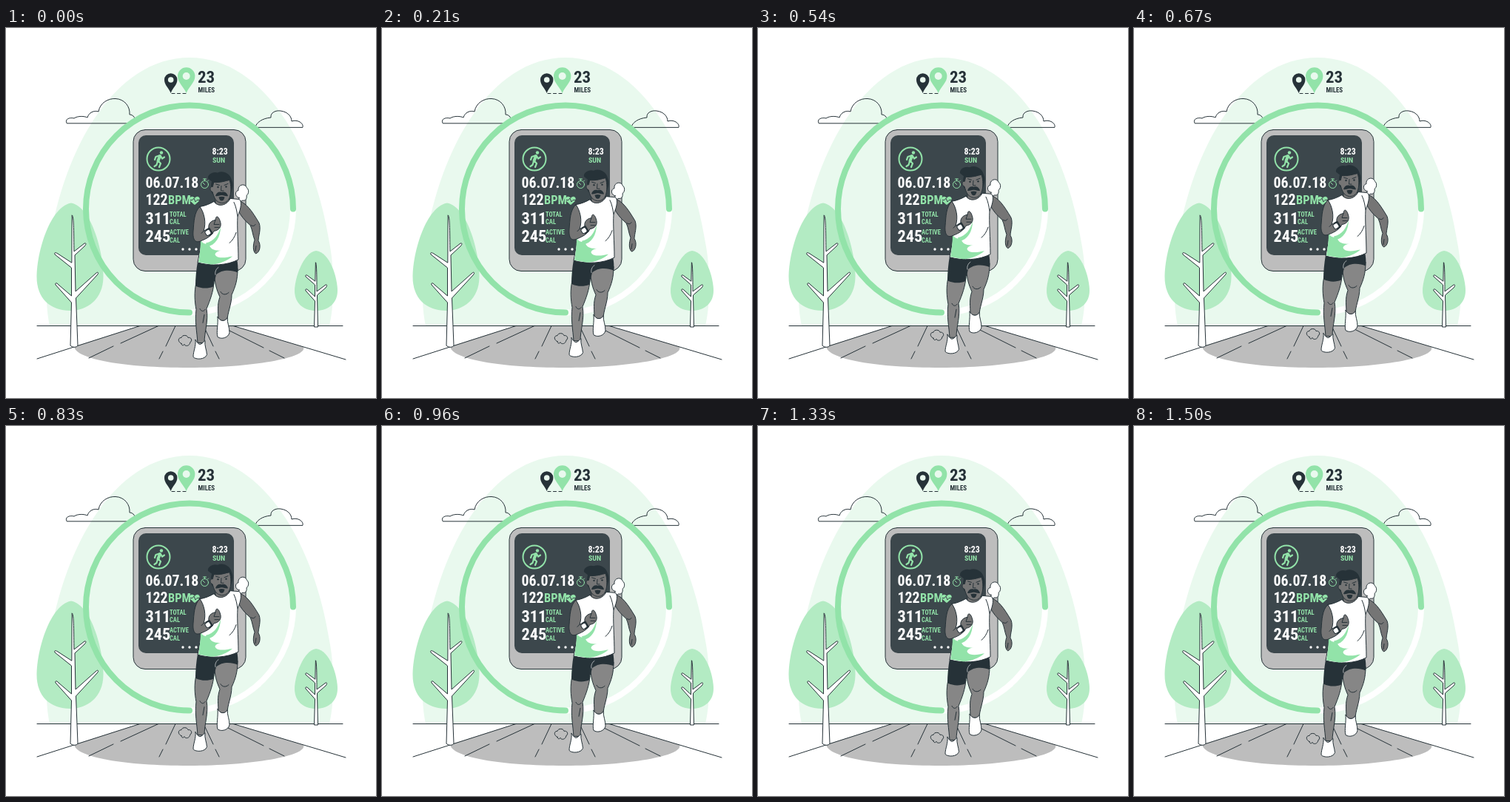
An HTML page that plays this animation: 500 px wide and 500 px high, repeating every 1540 ms.

```html
<!DOCTYPE html>
<html lang="en">
<head>
<meta charset="utf-8">
<title>Runner and fitness tracker</title>
<style>
  html, body { margin: 0; width: 100%; height: 100%; overflow: hidden; background: #fff; }
  svg { display: block; width: 100vw; height: 100vh; }
  path, line, circle, rect { stroke-linecap: round; stroke-linejoin: round; }
  .ink { stroke: #263238; stroke-width: 1; }
  .line { fill: none; stroke: #263238; stroke-width: 1; }
  .white { fill: #fff; }
  .pale { fill: #e9f9ee; }
  .grey { fill: #bdbdbd; }
  .dark { fill: #263238; }
  .green { fill: #92e3a9; }
  .leaf { fill: #b3ebc3; }
  .skin { fill: #757575; }
  #legs .skin { fill: #868686; }
  .glow { fill: none; stroke: #92e3a9; }
  #labels { font-weight: 700; font-stretch: 62.5%; }
</style>
</head>
<body>
<svg viewBox="0 0 500 500">
  <path class="pale" d="M59 402C53 375 53 325 59 290C78 165 146 40 248 40C350 40 418 165 437 290C444 325 444 375 437 402Z"/>

  <g id="clouds" class="line">
    <path d="M82 128.500C79 123 86 120.500 92 122C97 118.500 106 119 110 121C112 114 119 111 125 113C127 101 138 95 148 95.500C160 96 168 106 167 117C172 117 176 122 174 128.500Z"/>
    <path d="M337 134C338 128 346 122 358 121C357 114 365 111 371 112C380 113 386 119 386 126C394 123 403 129 401 134Z"/>
  </g>

  <g id="ground">
    <path class="grey" d="M181 402.500H307L402 431C408 446 330 459 247 459C160 459 95 448 92 430.500Z"/>
    <path class="line" d="M42 402.500H455M181 402.500L42 447M206 402.500L155 426M145 430L112 446M229 402.500L216 430M212 437L207 447M267 402.500L280 430M283 437L288 447M289 402.500L348 432M356 436L376 446M307 402.500L459 448"/>
  </g>

  <g id="trees">
    <path class="leaf" d="M88 236.500C115 241 131.500 302 131.500 336C131.500 366 110 382 87 382C60 382 41.500 366 41.500 336C41.500 302 60 241 88 236.500Z"/>
    <path class="white ink" d="M89.500 253C92 254 91.500 280 92 302L106 291C108 290 109 292 106 295L93 307L94 356L122 331C124 329 126 331 123 334L94.500 365L97 429C96 432 89 432 87 429L88.500 371L67 347C66 344 69 344 71 347L88.500 362V324L66 306C65 303 67 303 70 305L88.500 317Z"/>
    <path class="leaf" d="M419 301C438 303 448 338 448 355C448 372 435 382 419 382C402 382 390 372 390 355C390 338 402 303 419 301Z"/>
    <path class="white ink" d="M418.700 317C420 318 420 340 420 356L432 347C434 346 434 349 432 351L420.500 361L421.500 404H416.500L417.500 369L405 355C404 353 406 352 408 354L417.500 363V347L405 336C404 334 406 333 408 335L417.500 342Z"/>
  </g>

  <g id="ring" fill="none" stroke-width="8">
    <path stroke="#fff" d="M388 244.500A140 140 0 0 1 248 384.500"/>
    <path class="glow" d="M248 384.500A140 140 0 1 1 388 244.500"/>
  </g>

  <g id="device">
    <rect class="grey ink" x="172" y="137.500" width="152" height="191" rx="16"/>
    <rect fill="#3c474c" x="179" y="145" width="129" height="162" rx="10"/>
    <circle class="glow" cx="206" cy="177" r="15.500" stroke-width="2"/>
    <circle class="green" cx="210" cy="168.500" r="2.200"/>
    <path class="glow" stroke-width="4" d="M208 173L205.500 179.500"/>
    <path class="glow" stroke-width="2.200" d="M207 172.500L202.500 174L201 178M209 173L211 176.500L214 174.500M206 180L209 183L207 188M205 180L203.500 185L200.500 187"/>
    <g class="glow" stroke-width="1">
      <circle cx="268.500" cy="211.500" r="5"/>
      <path d="M268.500 206.500V204M266.500 204H270.500M268.500 211.500L266 209M272.500 207L273.500 206"/>
    </g>
    <path class="green" d="M255 239C251 236 248 233.500 248.300 230.500C249 227 253 227 255 230C257 227 261 227 261.700 230.500C262 233.500 259 236 255 239Z"/>
    <path fill="none" stroke="#3c474c" d="M248 232.500H252L254 230L256 235L258 232.500H262"/>
    <g class="white">
      <circle cx="239" cy="299" r="1.700"/>
      <circle cx="248" cy="299" r="1.700"/>
      <circle cx="257" cy="299" r="1.700"/>
    </g>
  </g>

  <g id="pins">
    <path class="line" stroke-dasharray="4 3.500" d="M224 88.500H244"/>
    <path class="dark" d="M222.700 88C220 81 214 77 214 70A8.700 8.700 0 0 1 231.400 70C231.400 77 225 81 222.700 88Z"/>
    <circle class="pale" cx="222.700" cy="70" r="3.800"/>
    <path class="green" d="M243.700 88C240 79 232 74 232 65A11.700 11.700 0 0 1 255.400 65C255.400 74 247 79 243.700 88Z"/>
    <circle class="pale" cx="243.700" cy="65" r="5"/>
  </g>

  <g id="labels"></g>

  <g id="runner">
    <path class="grey ink" d="M237 427C232 425 232 419 237 419C238 415 245 415 246 419C251 418 252 424 249 425C248 431 242 431 241 428C240 430 237 430 237 427Z"/>
    <path class="white ink" d="M315 230C309 229 309 221 314 220C313 212 323 210 325 216C329 219 328 225 325 227C326 231 323 235 320 233.500C316 236 314 234 315 230Z"/>

    <g id="legs">
      <path class="skin ink" d="M257 345C254 358 255 370 257 381C255 397 258 411 259 426H268C268 411 274 396 271 380C276 368 280 357 281 345Z"/>
      <path class="skin ink" d="M282 328C281 345 285 355 289 364C285 375 287 384 287 396H299C299 386 305 374 305 361C310 350 313 341 313 326Z"/>
      <path class="line" d="M262 380C264 384 267 384 269 381M290 357C292 361 297 362 301 358M268 388L266 399"/>
      <path class="dark" d="M259 316C257 328 256 339 256 349C264 353 273 353 280 350L284 334C291 327 304 327 313 331C314 324 313 318 312 312Z"/>
      <path stroke="#fff" stroke-width=".6" fill="none" d="M283 334C282 330 284 326 287 324"/>
      <path class="white ink" d="M256 422C258 425 260 428 262 428C265 428 267 424 269 423C268 430 271 435 271.500 442C269 449 256 449 253 445C253 437 257 431 256 422Z"/>
      <path class="white ink" d="M286 391C288 394 290 396 293 396C296 396 298 394 299 392C299 399 302 405 302 412C301 419 291 422 286 418C284 411 287 401 286 391Z"/>
    </g>

    <g id="arms">
      <path class="skin ink" d="M313 233.500C325 236 333 249 342 264C345 272 341 282 341 288C345 294 343 304 337.500 305.500C333 302 334 293 336 287C333 279 333 273 330 267C322 260 317 254 314 247Z"/>
      <path class="line" d="M338 295L337 302M331 267C334 269 336 268 337 266"/>
    </g>

    <path class="skin ink" d="M283 224V237C286 244 298 243 302 235L301 224Z"/>
    <path class="white ink" d="M281 235C286 243 298 241 303 231L315 232C319 234 318 244 313 255C312 270 314 292 314 313.500C299 321.500 277 322.500 259 317.500C262 302 264 288 263 272C266 262 265 250 262 242C269 241 276 238 281 235Z"/>
    <path class="green" d="M263 285C264 291 268 293 274 292C276 300 283 302 291 301C282 303 280 307 286 310C293 312 300 310 306 309C299 315 289 319.500 277 320L260 317C262 305 263 296 263 285Z"/>
    <path class="green" d="M270 291C281 289 287 280 290 269C290 283 283 294 272 296Z"/>
    <path class="line" d="M302 291C306 288 309 283 311 277M308 236C311 242 312 249 313 255"/>

    <path class="skin ink" d="M262 242C254 249 254 263 253 275C252 287 256 292 264 288C272 285 278 281 281 275C288 274 291 269 290 264C289 260 288 257 286 256C285 254 283 257 283 260C277 261 273 265 274 271L267 275C271 264 268 250 262 242Z"/>
    <path class="line" d="M283 260L281 266H288M282 270H288M267 275L264 278"/>
    <path class="dark" d="M270 273L275 270L280 278L275 282Z"/>
    <rect class="white ink" x="269.500" y="273.500" width="7" height="7" rx="2" transform="rotate(-32 273 277)"/>

    <g id="head">
      <path class="dark" d="M273 204C272 198 280 194 286 196C293 192.500 303 197 305 206C308 212 306 218 304 223L279 225C276 219 277 212 278 208Z"/>
      <path class="skin ink" d="M281 209C289 210 297 207 302 206C304.500 213 304.500 224 302 230C298 239 288 239 283 232C281 229 280 225 279 222C275 221 275 214 279 215Z"/>
      <path class="dark" d="M291.500 222.500C295 221 299 223 300 227.500C297 228.500 295 226.500 291.500 226.500C288 226.500 286 228.500 283 227.500C284 223 288 221 291.500 222.500Z"/>
      <path class="dark" d="M287.500 229C290 228 293 228 295.500 229C295 232 293.500 234 291.500 234C289.500 234 288 232 287.500 229Z"/>
      <path class="line" d="M291 214L290.500 220.500H294"/>
      <path class="line" stroke-width="1.600" d="M283.500 211.500L288.500 213M295 213L300 211"/>
      <circle class="dark" cx="286.500" cy="215.500" r="1.200"/>
      <circle class="dark" cx="297.500" cy="215" r="1.200"/>
    </g>
  </g>
</svg>

<script>
const WHITE = '#fff', GREEN = '#92e3a9', INK = '#263238';
const labels = document.getElementById('labels');
const runner = document.getElementById('runner');

// text, left, middle of the capitals, size in em, colour
const rows = [
  ['06.07.18', 188.5, 208.5, 1, WHITE],
  ['23', 259, 65.5, 1.15, INK],
  ['MILES', 259.5, 84, .45, INK],
  ['8:23', 278.5, 167, .6, WHITE],
  ['SUN', 279, 178.5, .5, GREEN],
  ['122', 188.5, 232, 1, WHITE],
  ['BPM', 219, 232, .82, GREEN],
  ['311', 188.5, 257, 1.12, WHITE],
  ['TOTAL', 221, 251.5, .43, GREEN],
  ['CAL', 221, 262, .43, GREEN],
  ['245', 188.5, 281.5, 1.12, WHITE],
  ['ACTIVE', 221, 276, .43, GREEN],
  ['CAL', 221, 287, .43, GREEN]
];

for (const [text, x, y, size, fill] of rows) {
  const el = document.createElementNS('http://www.w3.org/2000/svg', 'text');
  const attrs = { x, y, dy: '.357em', fill, 'font-size': size + 'em' };
  for (const name in attrs) el.setAttribute(name, attrs[name]);
  el.textContent = text;
  labels.append(el);
}

// Use the narrowest installed face and size all labels together.
const date = labels.firstChild;
labels.style.fontSize = '24px';
const setFace = face => labels.style.fontFamily = `"${face}", sans-serif`;
const faces = ['Noto Sans', 'Open Sans', 'Roboto', 'Roboto Condensed'].map(face => {
  setFace(face);
  return { face, width: date.getComputedTextLength() };
}).sort((a, b) => a.width - b.width);
setFace(faces[0].face);
labels.style.fontSize = Math.min(24, 24 * 72 / faces[0].width) + 'px';

// The runner floats up and down at constant speed, 24 poses a second.
const LOOP = 1540, FPS = 24, CYCLE = 36, LEAD = 1, LIFT = 10;

function draw(now) {
  const step = Math.floor((now % LOOP + 4.9) * FPS / 1000);
  const phase = (step + LEAD) % CYCLE / CYCLE;
  const rise = LIFT * (1 - Math.abs(1 - 2 * phase));
  runner.setAttribute('transform', `translate(0 ${-rise})`);
}

const start = performance.now();
function tick() {
  draw(performance.now() - start);
  requestAnimationFrame(tick);
}
tick();
</script>
</body>
</html>
```
